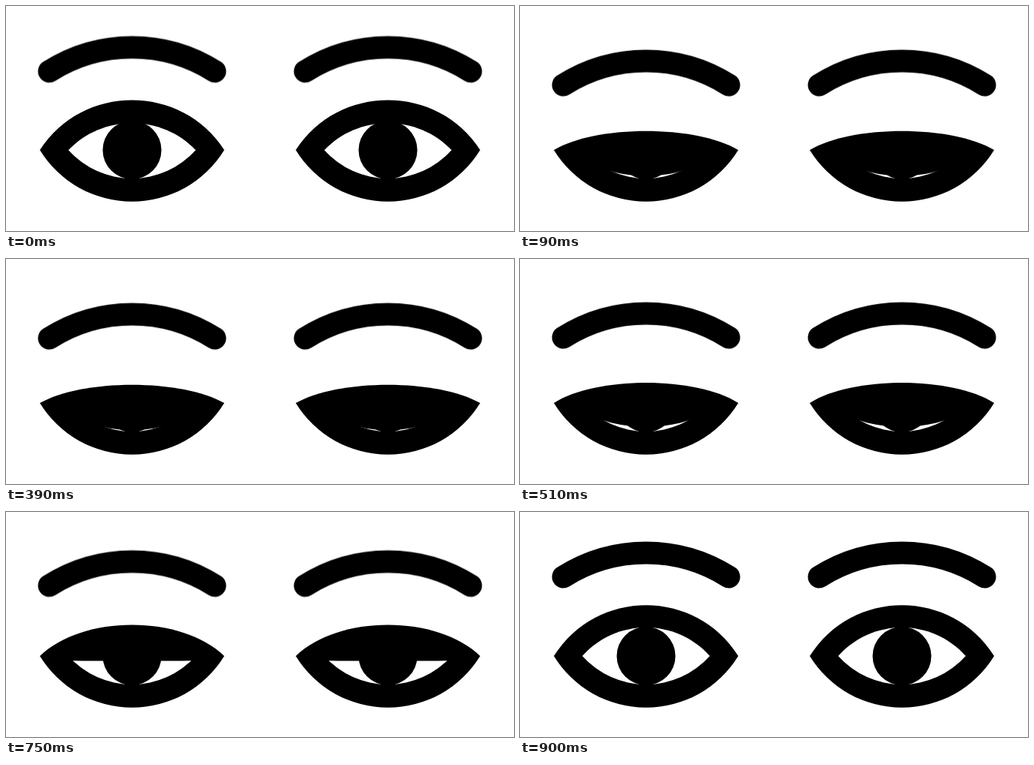
An HTML page without scripts that plays this animation: 675 px wide and 300 px high, repeating every 2.7 s.

```html
<!DOCTYPE html>
<html lang="en">
<head>
<meta charset="utf-8">
<title>Blinking eyes</title>
<style>
  html, body { margin: 0; width: 100%; height: 100%; overflow: hidden; background: #fff; }
  svg { display: block; width: 100vw; height: 100vh; }
  .brow, .eye, .white { animation: 2.7s infinite; }
  .brow {
    d: path("M57.5 86.5A205 205 0 0 1 277.5 86.5");
    fill: none; stroke: #000; stroke-width: 30; stroke-linecap: round;
    animation-name: brow;
  }
  .eye {
    d: path("M45 192C101.6 101.5 233.4 101.5 290 192A143.5 143.5 0 0 1 45 192Z");
    animation-name: eye;
  }
  .white {
    d: path("M82.8 192C127.9 141.3 207.1 141.3 252.2 192V270H82.8Z");
    fill: #fff;
    animation-name: white;
  }
  /* quick close, slow start to the opening, then rest */
  @keyframes brow {
    0% { transform: none; animation-timing-function: cubic-bezier(.2, .88, .5, .97); }
    5.5556% { transform: translateY(20px); animation-timing-function: cubic-bezier(.5, .03, .8, .12); }
    33.333%, 100% { transform: none; }
  }
  @keyframes eye {
    0% {
      d: path("M45 192C101.6 101.5 233.4 101.5 290 192A143.5 143.5 0 0 1 45 192Z");
      animation-timing-function: cubic-bezier(.2, .88, .5, .97);
    }
    5.5556% {
      d: path("M45 192C101.6 162 233.4 162 290 192A143.5 143.5 0 0 1 45 192Z");
      animation-timing-function: cubic-bezier(.5, .03, .8, .12);
    }
    33.333%, 100% { d: path("M45 192C101.6 101.5 233.4 101.5 290 192A143.5 143.5 0 0 1 45 192Z"); }
  }
  @keyframes white {
    0% {
      d: path("M82.8 192C127.9 141.3 207.1 141.3 252.2 192V270H82.8Z");
      animation-timing-function: cubic-bezier(.2, .88, .5, .97);
    }
    5.5556% {
      d: path("M82.8 203C127.9 240.8 207.1 240.8 252.2 203V270H82.8Z");
      animation-timing-function: cubic-bezier(.5, .03, .8, .12);
    }
    33.333%, 100% { d: path("M82.8 192C127.9 141.3 207.1 141.3 252.2 192V270H82.8Z"); }
  }
</style>
</head>
<body>
<svg viewBox="0 0 675 300">
  <defs>
    <clipPath id="lower">
      <path d="M82.8 90V192A113.5 113.5 0 0 0 252.2 192V90Z"/>
    </clipPath>
    <!-- everything but the iris -->
    <clipPath id="around">
      <path clip-rule="evenodd" d="M0 0H335V300H0ZM128.5 192a39 39 0 1 0 78 0a39 39 0 1 0 -78 0Z"/>
    </clipPath>
  </defs>
  <g>
    <path class="brow"/>
    <path class="eye"/>
    <g clip-path="url(#lower)"><g clip-path="url(#around)"><path class="white"/></g></g>
  </g>
  <g transform="translate(340)">
    <path class="brow"/>
    <path class="eye"/>
    <g clip-path="url(#lower)"><g clip-path="url(#around)"><path class="white"/></g></g>
  </g>
</svg>
</body>
</html>
```
